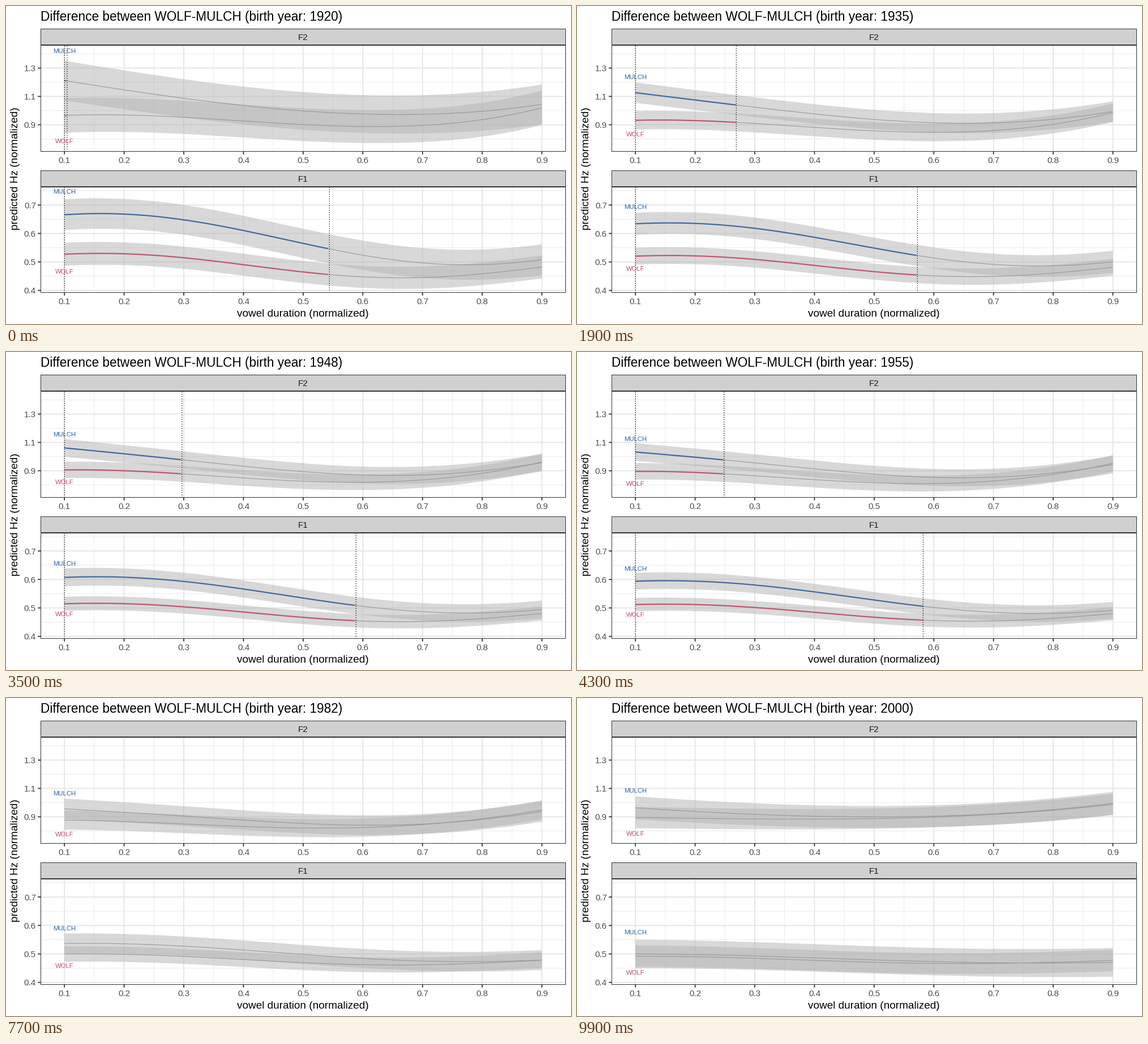
Recreate the animation shown at these times as a matplotlib script. Size 998x561 px, loop 10000 ms.

```python
import numpy as np
import matplotlib.pyplot as plt
from matplotlib.animation import FuncAnimation
from matplotlib.patches import Polygon, Rectangle

W, H, DPI = 998, 561, 64
PX = 72 / DPI
FRAMES, FIRST_YEAR, SPAN = 100, 1920, 80
LEFT, RIGHT = 61, 989
START, STOP = 0.1, 0.9
GRID = np.linspace(START, STOP, 300)

plt.rcParams["font.family"] = "Liberation Sans"
plt.rcParams["path.snap"] = False


def wave(x, mean, amp, peak, period):
    return mean + amp * np.cos(2 * np.pi * (x - peak) / period)


def valley(x, bottom, at, bend, skew):
    d = x - at
    return bottom + d * d * (bend + skew * d)


def blend(a, b, t):
    return a + (b - a) * t


# Fitted curves over x; t runs from 0 (first year) to 1 (last year).
def f2_mulch(x, t):
    dip = wave(x, 0.218, 0.056, 0.70, 0.85)
    return blend(valley(x, 0.972, 0.66, 1.1, 0.6),
                 valley(x, 0.899, 0.50, 0.5, 0.25), t) - dip * (t - t ** 3)


def f2_wolf(x, t):
    dip = wave(x, 0.171, 0.062, 0.58, 1.05)
    return blend(valley(x, 0.887, 0.62, 1.2, 1.75),
                 valley(x, 0.883, 0.38, 0.23, 0.3), t) - dip * (t - t ** 3)


def f1_mulch(x, t):
    return blend(wave(x, 0.580, 0.090, 0.16, 1.23),
                 wave(x, 0.484, 0.016, 0.08, 1.40), t)


def f1_wolf(x, t):
    return blend(wave(x, 0.487, 0.043, 0.16, 1.01),
                 wave(x, 0.479, 0.013, 0.10, 1.10), t)


# Half-widths of the confidence bands.
def settling(base, slope, extra):
    return lambda t: base + slope * t + extra * np.exp(-t / 0.13)


def bowl(base, bend):
    return lambda t: base + bend * (t - 0.52) ** 2


# Where the two bands begin to overlap.
def f2_end(t):
    return np.interp(t, [0, 0.1, 0.275, 0.4375, 0.556],
                     [0.1045, 0.186, 0.344, 0.2466, START])


def f1_end(t):
    return START + (0.444 + 0.15 * t) * np.sqrt(max(0, 1 - (t / 0.656) ** 5.5))


def to_x(x):
    return 103.2 + (np.asarray(x) - START) * 1054.2


fig = plt.figure(figsize=(W / DPI, H / DPI), dpi=DPI, facecolor="white")
ax = fig.add_axes([0, 0, 1, 1])
ax.set_xlim(0, W)
ax.set_ylim(H, 0)
ax.axis("off")


def line(x, y, color, width, z, **kw):
    return ax.plot(x, y, color=color, lw=width * PX, zorder=z,
                   solid_capstyle="butt", **kw)[0]


def text(x, y, s, size, color="black", ha="center", va="baseline", **kw):
    return ax.text(x, y, s, fontsize=size * PX, color=color, ha=ha, va=va,
                   zorder=8, **kw)


class Series:
    def __init__(self, to_y, fit, half, name, color, label_color, side):
        self.to_y, self.fit, self.half, self.side = to_y, fit, half, side
        self.band = ax.add_patch(Polygon([[0, 0]], fc="#B3B3B3", alpha=0.5, lw=0, zorder=3))
        self.thin = line([], [], "#969696", 1.1, 4)
        self.bold = line([], [], color, 2.2, 5)
        self.label = text(103, 0, name, 11.4, label_color, va="center_baseline")

    def draw(self, t, end):
        fit, half0 = self.fit(GRID, t), self.half(t)
        half = half0 * (1 - 0.05 * np.sin(np.pi * (GRID - START) / (STOP - START)))
        xs, ys = to_x(GRID), self.to_y(fit)
        upper = np.column_stack([xs, self.to_y(fit + half)])
        lower = np.column_stack([xs, self.to_y(fit - half)])
        self.band.set_xy(np.vstack([upper, lower[::-1]]))
        self.thin.set_data(xs, ys)
        inside = GRID <= end
        self.bold.set_data(xs[inside], ys[inside])
        self.label.set_y(self.to_y(fit[0] + self.side * 1.5 * half0) - 0.5)


class Panel:
    def __init__(self, name, top, bottom, origin, scale, ticks, step, end, mulch, wolf):
        self.origin, self.scale, self.end = origin, scale, end
        strip = top - 29
        ax.add_patch(Rectangle((LEFT, strip), RIGHT - LEFT, 29, fc="#D0D0D0", lw=0, zorder=1))
        text((LEFT + RIGHT) / 2, strip + 20, name, 15.2, "#1A1A1A")

        for x in np.arange(1, 10) / 10:
            if x < STOP:
                line([to_x(x + 0.05)] * 2, [top, bottom], "#EBEBEB", 1, 1)
            line([to_x(x)] * 2, [top, bottom], "#E6E6E6", 1.9, 2)
            line([to_x(x)] * 2, [bottom, bottom + 4.8], "#333333", 1.8, 7)
            text(to_x(x), bottom + 20, f"{x:.1f}", 15.2, "#4D4D4D")
        for y in ticks:
            py = self.to_y(y)
            line([LEFT, RIGHT], [py] * 2, "#E6E6E6", 1.9, 2)
            line([LEFT - 4.8, LEFT], [py] * 2, "#333333", 1.8, 7)
            text(53, py + 5.5, f"{y:.1f}", 15.2, "#4D4D4D", ha="right")
        for y in [ticks[0] - step / 2] + [y + step / 2 for y in ticks]:
            py = self.to_y(y)
            if top < py < bottom:
                line([LEFT, RIGHT], [py] * 2, "#EBEBEB", 1, 1)

        for y0, y1 in ((strip, top), (top, bottom)):
            ax.add_patch(Rectangle((LEFT + 0.5, y0 + 0.5), RIGHT - LEFT - 1, y1 - y0 - 1,
                                   fc="none", ec="#333333", lw=PX, zorder=7, snap=False))
        self.series = [Series(self.to_y, *wolf, "WOLF", "#BF566C", "#C04D63", -1),
                       Series(self.to_y, *mulch, "MULCH", "#40699F", "#2F619F", 1)]
        self.marks = [line([to_x(START)] * 2, [bottom, top], "black", 1.3, 6,
                           ls=(0, (1, 2.1)), dash_capstyle="butt") for _ in range(2)]

    def to_y(self, value):
        return self.origin - value * self.scale

    def draw(self, t):
        end = self.end(t)
        for mark in self.marks:
            mark.set_visible(end > START)
        self.marks[1].set_xdata([to_x(end)] * 2)
        for series in self.series:
            series.draw(t, end if end > START else 0)


panels = [
    Panel("F2", 69, 257, 434.5, 250, (0.9, 1.1, 1.3), 0.2, f2_end,
          (f2_mulch, settling(0.042, 0.039, 0.098)),
          (f2_wolf, settling(0.040, 0.035, 0.082))),
    Panel("F1", 319, 506, 702.5, 502, (0.4, 0.5, 0.6, 0.7), 0.1, f1_end,
          (f1_mulch, bowl(0.029, 0.093)),
          (f1_wolf, bowl(0.023, 0.065))),
]

title = text(LEFT, 25.5, "", 22.66, ha="left")
text(524.5, 547.5, "vowel duration (normalized)", 18.95)
text(17, 287, "predicted Hz (normalized)", 18.95, va="center", rotation=90)


def update(i):
    t = i / (FRAMES - 1)
    title.set_text("Difference between WOLF-MULCH "
                   f"(birth year: {FIRST_YEAR + round(SPAN * t)})")
    for panel in panels:
        panel.draw(t)
    return []


anim = FuncAnimation(fig, update, frames=FRAMES, interval=100, repeat=True,
                     repeat_delay=0, init_func=lambda: update(0))
plt.show()
```
